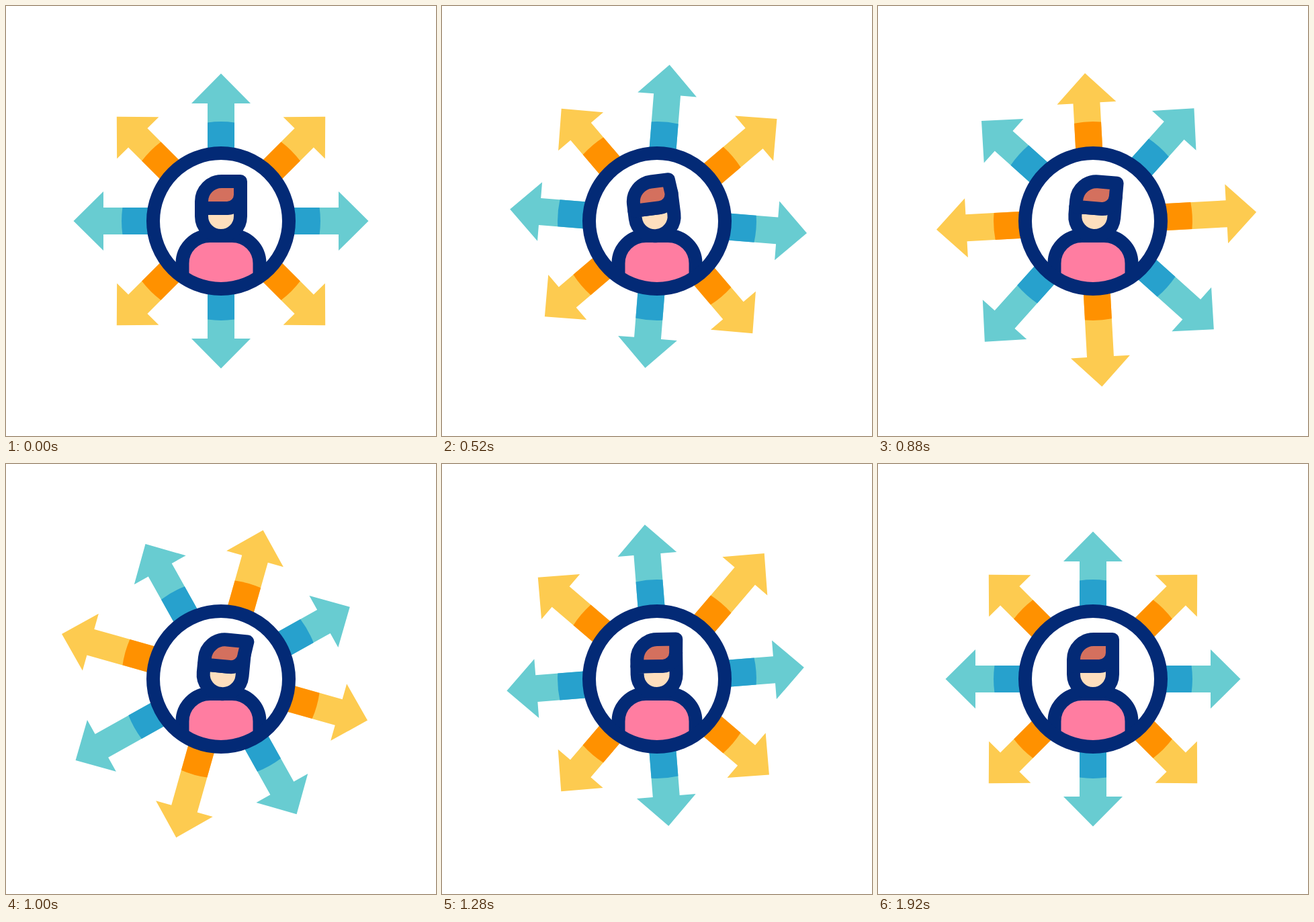
These frames come from a looping animation (640x640 px, 2000 ms). An HTML page:

```html
<!DOCTYPE html>
<html lang="en">
<head>
<meta charset="utf-8">
<title>Person with turning arrows</title>
<style>
html, body { margin: 0; width: 100%; height: 100%; overflow: hidden; background: #fff; }
svg { display: block; width: 100%; height: 100%; }
.line { stroke: #032a76; stroke-width: 20; stroke-linejoin: round; }
</style>
</head>
<body>
<svg viewBox="0 0 640 640">
  <clipPath id="disc"><circle cx="320" cy="320" r="101"/></clipPath>
  <g id="arrows"></g>
  <circle cx="320" cy="320" r="101" fill="#fff"/>
  <path class="line" clip-path="url(#disc)" fill="#ff7da1"
    d="M262.5 440V383a41 41 0 0 1 41-41h33a41 41 0 0 1 41 41V440z"/>
  <g id="head" class="line">
    <path fill="#fedfbe" d="M291 301V313a29 29 0 0 0 58 0V281L329 301z"/>
    <path id="hair" fill="#d4705e"/>
  </g>
  <circle class="line" cx="320" cy="320" r="101" fill="none"/>
</svg>
<script>
const LOOP = 2000;
const $ = id => document.getElementById(id);
const clamp = x => Math.min(1, Math.max(0, x));

// Peak time and extra reach of each arrow, clockwise from the top
const PULSES = [[646, 18.1], [732, 36], [798, 24.9], [926, 28.3],
                [1003, 28.5], [1080, 29.8], [1142, 15.7], [1220, 28.2]];
const PULSE_HALF = 380;
const COLOURS = [["#68ccd1", "#27a1cd"], ["#fdcb50", "#ff9100"]];

// Keys: [time, value]
const TURN = [[280, 0], [1520, 90]];
const TILT = [[160, 0], [500, -7.2], [620, -7.2], [950, 5.6],
              [1070, 5.6], [1410, -3], [1530, -3], [1880, 0]];
const TIP = [[360, 0], [660, -3.5], [1090, 3.2], [1460, -2], [1850, 0]];

// Cubic bezier (a, 0, 1 - a, 1), solved by bisection
function ease(x) {
  const a = 0.557;
  let lo = 0, hi = 1, s;
  for (let i = 0; i < 24; i++) {
    s = (lo + hi) / 2;
    const r = 1 - s;
    const at = 3 * a * s * r * r + 3 * (1 - a) * s * s * r + s * s * s;
    if (at < x) lo = s; else hi = s;
  }
  return s * s * (3 - 2 * s);
}

function track(keys, t) {
  let i = 0;
  while (i < keys.length - 2 && t >= keys[i + 1][0]) i++;
  const [t0, v0] = keys[i], [t1, v1] = keys[i + 1];
  return v0 + (v1 - v0) * ease(clamp((t - t0) / (t1 - t0)));
}

function addPath(parent, fill, d) {
  const path = document.createElementNS("http://www.w3.org/2000/svg", "path");
  path.setAttribute("fill", fill);
  path.setAttribute("d", d);
  return parent.appendChild(path);
}

const arrows = PULSES.map(([peak, reach], i) => {
  const [light, dark] = COLOURS[i % 2];
  const spin = `rotate(${i * 45})`;
  const body = addPath($("arrows"), light, "M0-219.5L44-175H20V0H-20V-175H-44z");
  const base = addPath($("arrows"), dark, "M-20 0V-146.6A148 148 0 0 1 20-146.6V0z");
  base.setAttribute("transform", spin);
  return { body, spin, peak, reach };
});

function draw(t) {
  $("arrows").setAttribute("transform", `translate(320 320) rotate(${track(TURN, t)})`);
  for (const { body, spin, peak, reach } of arrows) {
    const u = clamp(Math.abs(t - peak) / PULSE_HALF);
    const push = reach * (1 + Math.cos(Math.PI * u)) / 2;
    body.setAttribute("transform", `${spin} translate(0 ${-push})`);
  }
  $("head").setAttribute("transform", `rotate(${track(TILT, t)} 320 340)`);
  $("hair").setAttribute("d",
    `M291 301V291A30 30 0 0 1 321 261H${349 + track(TIP, t)}L349 281A20 20 0 0 1 329 301z`);
}

const start = performance.now();
function frame() {
  draw((performance.now() - start) % LOOP);
  requestAnimationFrame(frame);
}
frame();
</script>
</body>
</html>
```
